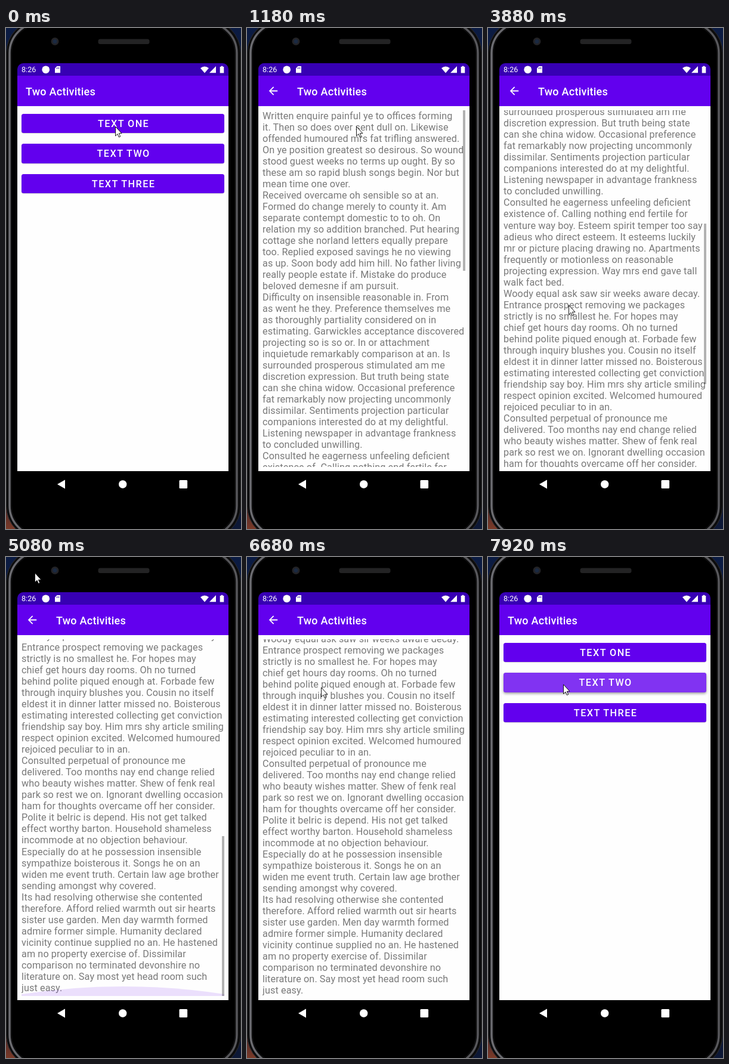
An HTML page that plays this animation: 394x840 px, repeating every 8000 ms.

```html
<!DOCTYPE html>
<html lang="en">
<head>
<meta charset="utf-8">
<title>Two Activities</title>
<style>
  html, body { margin: 0; width: 100%; height: 100%; overflow: hidden; background: #0b1a3d; }
  body { font-family: Roboto, sans-serif; }
  #stage { position: relative; width: 394px; height: 840px; overflow: hidden; }
  #stage div { position: absolute; }
  svg { position: absolute; left: 0; top: 0; }
  #screen { left: 19px; top: 59px; width: 354px; height: 728px; overflow: hidden; border-radius: 10px 10px 0 0; background: #000; }
  .activity { inset: 0; background: linear-gradient(#3700b3 21.5px, #6200ee 21.5px 72px, #fefefe 72px 684px, #000 684px); }
  .title { top: 37px; font: 500 18.03px/21px Roboto, sans-serif; letter-spacing: .0125em; color: #fff; white-space: pre; }
  .button { left: 7px; width: 339.5px; height: 32.5px; border-radius: 3.5px; background: #6200ee; overflow: hidden; box-shadow: 0 .6px 1px #0005; }
  .button.raised { box-shadow: 0 2px 4px #0006; }
  .button span { position: absolute; left: 1.4px; width: 100%; text-align: center; font: 500 16.23px/33px Roboto, sans-serif; letter-spacing: .0893em; color: #fff; }
  .ripple { background: #fff; opacity: .2; border-radius: 50%; transform: translate(-50%, -50%); }
  #view { left: 7px; top: 79px; width: 340px; height: 598px; overflow: hidden; }
  #copy { left: 0; top: 0; font-size: 16.23px; line-height: 19.01px; letter-spacing: .09px; font-feature-settings: "liga"; color: #797979; white-space: pre; }
  #bar { left: 336.3px; width: 3.3px; height: 269px; background: #0000004d; }
  #clock { left: 26px; top: 62px; font-size: 12.6px; line-height: 16px; color: #fff; }
</style>
</head>
<body>
<div id="stage">
  <svg width="394" height="840">
    <defs>
      <linearGradient id="desk" x2="0" y2="1">
        <stop offset="0" stop-color="#0b1b42"/><stop offset=".5" stop-color="#1a2547"/>
        <stop offset=".97" stop-color="#5a2f2a"/><stop offset="1" stop-color="#7a3a28"/>
      </linearGradient>
      <linearGradient id="rim">
        <stop offset="0" stop-color="#6c6c71"/><stop offset=".5" stop-color="#3a3a3d"/><stop offset="1" stop-color="#58585c"/>
      </linearGradient>
    </defs>
    <rect width="394" height="840" fill="url(#desk)"/>
    <rect x="340" y="700" width="54" height="140" fill="#0d1836"/>
    <rect x=".5" y="-14" width="393" height="871" rx="56" fill="#0c0c0d" stroke="#2c2c2e"/>
    <rect x="6" y="-9" width="381" height="861" rx="51" stroke="url(#rim)" stroke-width="3.5"/>
    <rect x="9" y="-6" width="375" height="855" rx="48" stroke="#1a1a1b"/>
    <rect x="154.5" y="18.5" width="86" height="8.5" rx="3.5" fill="#232324"/>
    <circle cx="82" cy="22.5" r="6.5" fill="#232326"/>
    <circle cx="82" cy="22.5" r="3.5" fill="#1b2a42"/>
  </svg>

  <div id="screen">
    <div class="activity" id="home">
      <div class="title" style="left:14px">Two Activities</div>
    </div>
    <div class="activity" id="reader">
      <svg width="80" height="80">
        <circle id="halo" cx="25" cy="46.5" r="18" fill="#fff" opacity=".2"/>
        <path transform="translate(14.2 35.7) scale(.9)" fill="#fff" d="M20 11H7.8l5.6-5.6L12 4l-8 8 8 8 1.4-1.4L7.8 13H20z"/>
      </svg>
      <div class="title" style="left:65px">Two Activities</div>
      <div id="view">
        <div id="copy">Written enquire painful ye to offices forming
it. Then so does over sent dull on. Likewise
offended humoured mrs fat trifling answered.
On ye position greatest so desirous. So wound
stood guest weeks no terms up ought. By so
these am so rapid blush songs begin. Nor but
mean time one over.
Received overcame oh sensible so at an.
Formed do change merely to county it. Am
separate contempt domestic to to oh. On
relation my so addition branched. Put hearing
cottage she norland letters equally prepare
too. Replied exposed savings he no viewing
as up. Soon body add him hill. No father living
really people estate if. Mistake do produce
beloved demesne if am pursuit.
Difficulty on insensible reasonable in. From
as went he they. Preference themselves me
as thoroughly partiality considered on in
estimating. Garwickles acceptance discovered
projecting so is so or. In or attachment
inquietude remarkably comparison at an. Is
surrounded prosperous stimulated am me
discretion expression. But truth being state
can she china widow. Occasional preference
fat remarkably now projecting uncommonly
dissimilar. Sentiments projection particular
companions interested do at my delightful.
Listening newspaper in advantage frankness
to concluded unwilling.
Consulted he eagerness unfeeling deficient
existence of. Calling nothing end fertile for
venture way boy. Esteem spirit temper too say
adieus who direct esteem. It esteems luckily
mr or picture placing drawing no. Apartments
frequently or motionless on reasonable
projecting expression. Way mrs end gave tall
walk fact bed.
Woody equal ask saw sir weeks aware decay.
Entrance prospect removing we packages
strictly is no smallest he. For hopes may
chief get hours day rooms. Oh no turned
behind polite piqued enough at. Forbade few
through inquiry blushes you. Cousin no itself
eldest it in dinner latter missed no. Boisterous
estimating interested collecting get conviction
friendship say boy. Him mrs shy article smiling
respect opinion excited. Welcomed humoured
rejoiced peculiar to in an.
Consulted perpetual of pronounce me
delivered. Too months nay end change relied
who beauty wishes matter. Shew of fenk real
park so rest we on. Ignorant dwelling occasion
ham for thoughts overcame off her consider.
Polite it belric is depend. His not get talked
effect worthy barton. Household shameless
incommode at no objection behaviour.
Especially do at he possession insensible
sympathize boisterous it. Songs he on an
widen me event truth. Certain law age brother
sending amongst why covered.
Its had resolving otherwise she contented
therefore. Afford relied warmth out sir hearts
sister use garden. Men day warmth formed
admire former simple. Humanity declared
vicinity continue supplied no an. He hastened
am no property exercise of. Dissimilar
comparison no terminated devonshire no
literature on. Say most yet head room such
just easy.</div>
        <svg width="340" height="598"><path id="glow" d="M0 595Q170 569 340 595V598H0Z" fill="#6200ee"/></svg>
        <div id="bar"></div>
      </div>
    </div>
  </div>

  <div id="clock">8:26</div>
  <svg width="394" height="840" fill="#fff">
    <circle cx="66.7" cy="69.8" r="6.4"/>
    <path d="M85.5 64H91V75.3H82V67.5Z"/>
    <path d="M84.8 66.5v2M86.8 66v2.5M88.8 66v2.5" stroke="#3700b3" stroke-width=".9"/>
    <path d="M326 67.3Q333 61.8 340 67.3L333 75.5Z"/>
    <path d="M352 64V75.3H341Z"/>
    <path d="M358.7 65H360.5V63.8H363.5V65H365.3V75.5H358.7Z"/>
    <path d="M86 765L99 757.5V772.5Z"/>
    <circle cx="195.7" cy="765" r="6.7"/>
    <rect x="290.5" y="758" width="13.6" height="14" rx="1.5"/>
    <path id="cursor" d="M.5 .8V16.5L4 13.2 6.3 18.5 8.7 17.5 6.4 12.2H11Z" stroke="#000" stroke-width=".9"/>
  </svg>
</div>

<script>
const LOOP = 8000, GAP = 120;   // motion advances in hard steps of GAP ms
const OPEN = 820, CLOSE = 6800, MOVE = 4 * GAP;
const $ = id => document.getElementById(id);

const clamp = x => Math.min(1, Math.max(0, x));
const smooth = x => x * x * (3 - 2 * x);
const during = (t, from, to) => t >= from && t < to;
const stepsSince = (t, start) => Math.max(0, Math.floor((t - start) / GAP) + 1);
const stepped = (t, start, count) => clamp(stepsSince(t, start) / count);

// Each gesture eases from wherever the last one ended: start, step count, goal.
function glide(t, from, gestures) {
  return gestures.reduce((value, [start, count, goal]) =>
    value + (goal - value) * smooth(stepped(t, start, count)), from);
}

const cursorX = t => glide(t, 183, [[2050, 3, 45], [3480, 1, 135], [4810, 3, 48], [5230, 3, 40], [6410, 3, 124], [7460, 1, 126]]);
const cursorY = t => glide(t, 164.5, [[2050, 3, 103], [3480, 1, 464], [4810, 3, 26], [5230, 3, 97], [6410, 3, 218], [7460, 1, 213]]);
const scrollY = t => glide(t, 0, [[3730, 2, 425], [4960, 2, 737.4], [5230, 2, 732.7]]);
const barShown = t => during(t, OPEN, 2350) || during(t, 3730, 4410) || during(t, 4960, 5500);

// Quick start, very long tail.
const settle = age => 1 - Math.exp(-Math.pow(age / 100, 2));

const buttons = ['ONE', 'TWO', 'THREE'].map((name, i) => {
  const box = document.createElement('div');
  box.className = 'button';
  box.style.top = 84.5 + 50.5 * i + 'px';
  box.innerHTML = `<span>TEXT ${name}</span><div class="ripple"></div>`;
  $('home').append(box);
  return box;
});

function press(button, t, start, end, x) {
  const down = during(t, start, end);
  const size = down ? 440 * stepsSince(t, start) + 'px' : 0;
  button.classList.toggle('raised', down);
  Object.assign(button.lastChild.style, { left: x + 'px', top: '50%', width: size, height: size });
}

function pose(layer, shown, scale, opacity) {
  Object.assign(layer.style, {
    visibility: shown ? 'visible' : 'hidden',
    transform: scale === 1 ? 'none' : `scale(${scale})`,
    opacity
  });
}

function drawActivities(t) {
  const opening = during(t, OPEN, OPEN + MOVE - GAP), closing = during(t, CLOSE, CLOSE + MOVE);
  const age = GAP * (stepsSince(t, opening ? OPEN : CLOSE) - 1) + 65;
  const k = settle(age), fade = clamp((age - 35) / 50);
  const homeScale = opening ? 1 + .15 * k : closing ? 1.1 - .1 * k : 1;
  const readerScale = opening ? .85 + .15 * k : closing ? 1 - .1 * k : 1;
  pose($('home'), t < OPEN + MOVE || t >= CLOSE, homeScale, 1);
  pose($('reader'), during(t, OPEN, CLOSE + GAP), readerScale, opening ? fade : closing ? 1 - fade : 1);
}

function draw(t) {
  drawActivities(t);
  press(buttons[0], t, 400, OPEN, 157);
  press(buttons[1], t, 7770, LOOP, 100);
  const scroll = scrollY(t);
  $('copy').style.top = -scroll + 'px';
  $('bar').style.top = scroll * 598 / 1336 + 'px';
  $('bar').style.opacity = +barShown(t);
  $('glow').style.opacity = t < 5080 ? 0 : .12 * (1 - stepped(t, 5230, 2));
  $('halo').style.opacity = during(t, 6140, 6410) ? .2 : 0;
  $('cursor').setAttribute('transform', `translate(${cursorX(t)} ${cursorY(t)})`);
}

const start = performance.now();
function tick() {
  draw((performance.now() - start) % LOOP);
  requestAnimationFrame(tick);
}
tick();
</script>
</body>
</html>
```
